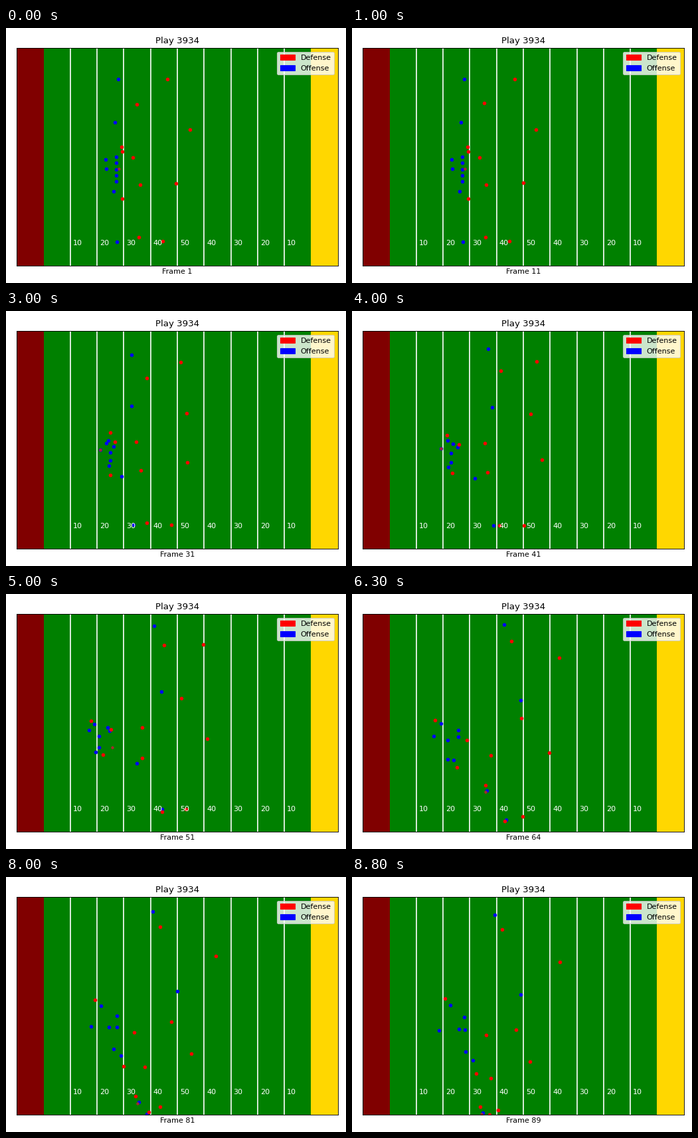
Write a matplotlib script that moves like this. It is 512 px wide and 384 px high and loops after 8.9 s.

```python
import numpy as np
import matplotlib.pyplot as plt
from matplotlib.animation import FuncAnimation
from matplotlib.patches import Patch

W, H, DPI = 512, 384, 80
LEFT, RIGHT, TOP, BOTTOM = 16.25, 499.75, 30.0, 358.0
FRAMES, STEP = 89, 100
YARD = (RIGHT - LEFT) / 120

# Key moments of the play, in frames.
SNAP, THROW, WHISTLE = 17, 50, 88
MOMENTUM = 0.7
NUDGE = (-0.7, -0.5)


def run(start, spot, end, begin=SNAP, pace=1.1):
    """Run from start to spot by the throw, then bend towards the end."""
    start, spot, end = np.array([start, spot, end], float)
    t = np.arange(FRAMES)[:, None]
    early = np.clip((t - begin) / (THROW - begin), 0, 1) ** pace
    late = np.clip((t - THROW) / (WHISTLE - THROW), 0, 1)
    late = late * (1.25 - 0.25 * late)
    drift = MOMENTUM * late * (1 - late) * (spot - start)
    return start + early * (spot - start) + late * (end - spot) + drift


def rush(start, spot, end):
    return run(start, spot, end, pace=0.5)


def cover(start, spot, end):
    return run(start, spot, end, begin=0, pace=2)


def lineman(i, spot, end):
    return run((166.5, 194.7 + 9.2 * i), spot, end)


def blend(a, b, t0, t1):
    """Travel at even speed from path a to path b."""
    u = np.clip((np.arange(FRAMES)[:, None] - t0) / (t1 - t0), 0, 1)
    return a + u * (b - a)


passer = run((152, 212), (126, 205), (132, 231))
catcher = run((162.5, 246), (197.5, 255.5), (197.5, 355))

offense = [
    passer,
    catcher,
    run((170, 77), (223.5, 48), (215.5, 57)),
    run((165, 142), (234.5, 147.5), (255, 177)),
    run((168, 322), (235.5, 324), (200, 364)),
    run((151, 198), (154, 201), (170, 211)),
    lineman(0, (134, 196), (149, 193.5)),
    lineman(1, (156.5, 206), (171, 230)),
    lineman(2, (141, 214.5), (161.5, 229)),
    lineman(3, (141, 231.5), (183, 276.5)),
    lineman(4, (135.5, 238), (171.5, 263.5)),
]
defense = [
    run((174.5, 179.5), (129, 191.5), (141, 183)),
    rush((175.5, 186.5), (159, 204.5), (202.5, 238)),
    rush((176, 257), (147, 242.5), (187.5, 296.5)),
    cover((244, 77.5), (297.5, 76.5), (314, 128)),
    cover((198, 115.5), (239, 77), (227, 79.5)),
    cover((278, 153), (264.5, 157.5), (248, 230)),
    cover((192, 195.5), (205.5, 201.5), (209.5, 303.5)),
    cover((257, 234), (303.5, 218.5), (269, 278)),
    cover((202.5, 236.5), (205.5, 247.5), (193.5, 346.5)),
    cover((200.5, 315), (235.5, 328.5), (208, 358)),
    cover((236.5, 321.5), (272, 324), (221, 351)),
]

# The ball is snapped to the passer, then thrown to the catcher.
held = blend(np.array([170.5, 212]), passer + (0.5, 0), SNAP - 3, SNAP + 3)
ball = blend(held, catcher + (-2, 2), THROW - 4, THROW + 4)

plt.rcParams["font.family"] = "DejaVu Sans"
fig = plt.figure(figsize=(W / DPI, H / DPI), dpi=DPI, facecolor="white")
ax = fig.add_axes([LEFT / W, 1 - BOTTOM / H, (RIGHT - LEFT) / W, (BOTTOM - TOP) / H])
ax.set(xlim=(LEFT, RIGHT), ylim=(BOTTOM, TOP), xticks=[], yticks=[], facecolor="green")
ax.set_title("Play 3934", fontsize=12)
label = ax.set_xlabel("Frame 1", fontsize=10)


def yard_x(yards):
    return LEFT + yards * YARD


ax.axvspan(yard_x(0), yard_x(10), color="maroon", lw=0, zorder=0.5)
ax.axvspan(yard_x(110), yard_x(120), color="gold", lw=0, zorder=0.5)
for yards in range(20, 110, 10):
    ax.axvline(yard_x(yards), color="white", lw=1.5, zorder=1)
    mark = 50 - abs(60 - yards)
    ax.text(yard_x(yards + 1), BOTTOM - 30.8, str(mark), color="white", fontsize=10)


def layer(color, size, tracks):
    dots = ax.plot([], [], "o", color=color, ms=size, zorder=2)[0]
    return dots, np.array(tracks) + NUDGE


layers = [layer("blue", 4, offense), layer("red", 4, defense), layer("brown", 3, [ball])]
ax.legend(handles=[Patch(color="red", label="Defense"), Patch(color="blue", label="Offense")],
          loc="upper right", fontsize=10)


def draw(n):
    for dots, tracks in layers:
        dots.set_data(tracks[:, n, 0], tracks[:, n, 1])
    label.set_text(f"Frame {n + 1}")
    return [dots for dots, _ in layers] + [label]


anim = FuncAnimation(fig, draw, frames=FRAMES, interval=STEP, repeat=True, repeat_delay=0)
plt.show()
```
